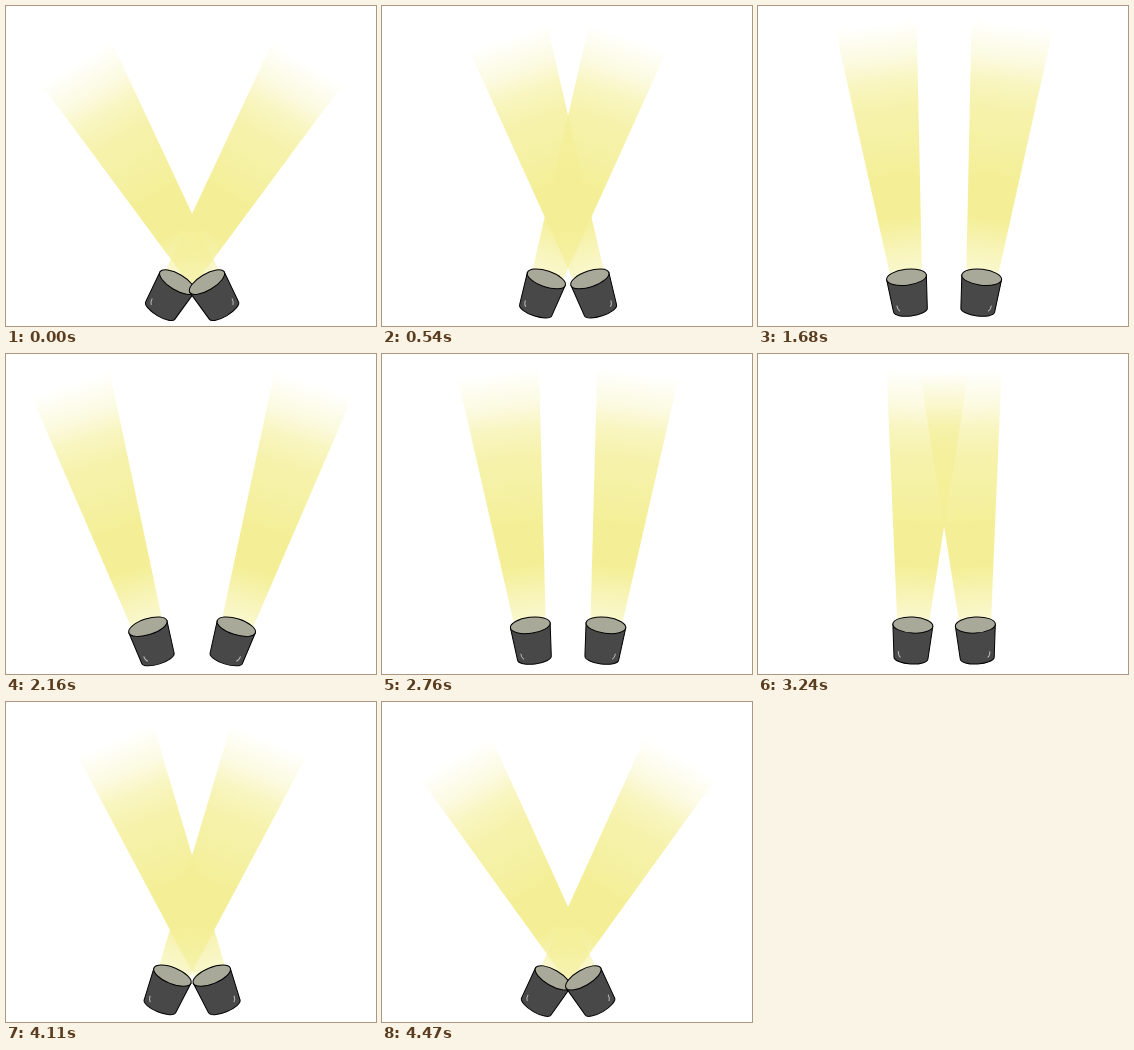
An HTML page for the animation above (4.5 s loop, 370 by 320 pixels).

```html
<!DOCTYPE html>
<html lang="en">
<head>
<meta charset="utf-8">
<title>Spotlights</title>
<style>
  html, body { margin: 0; height: 100%; overflow: hidden; background: #fff; }
  svg { display: block; }
  stop { stop-color: #f4ef97; }
</style>
</head>
<body>
<svg width="370" height="320" viewBox="0 0 370 320">
  <defs>
    <linearGradient id="glow" gradientUnits="userSpaceOnUse" x1="0" y1="-33" x2="0" y2="-288">
      <stop offset="0" stop-opacity=".42"/>
      <stop offset=".12" stop-opacity=".7"/>
      <stop offset=".23"/>
      <stop offset=".4"/>
      <stop offset=".5" stop-opacity=".9"/>
      <stop offset=".66" stop-opacity=".8"/>
      <stop offset=".77" stop-opacity=".6"/>
      <stop offset=".86" stop-opacity=".3"/>
      <stop offset="1" stop-opacity="0"/>
    </linearGradient>
    <path id="beam" fill="url(#glow)" d="M-15.6-33L-41-288H41L15.6-33Z"/>
    <g id="lamp" stroke="#000">
      <path fill="#484848" d="M-20-33L-17 0A17 6 0 0 0 17 0L20-33Z"/>
      <ellipse cy="-33" rx="20" ry="8" fill="#a9a999"/>
      <path fill="none" stroke="#bbb" d="M-13-6Q-13-2-10.5 0"/>
    </g>
  </defs>
  <!-- Both lamps turn about a point below their base; the right one mirrors the left. -->
  <use href="#beam" class="left"/>
  <use href="#beam" class="right"/>
  <use href="#lamp" class="left"/>
  <use href="#lamp" class="right"/>
</svg>
<script>
  const LOOP = 4500, TURN = 2220, STEP = 30;
  const INWARD = 30.8, OUTWARD = -19;

  function place(selector, transform) {
    for (const el of document.querySelectorAll(selector)) el.setAttribute('transform', transform);
  }

  function draw(now) {
    const t = Math.floor((now % LOOP) / STEP) * STEP;
    const swing = t < TURN ? t / TURN : (LOOP - t) / (LOOP - TURN);
    const angle = INWARD + (OUTWARD - INWARD) * swing;
    const pose = `translate(152.8 307) rotate(${angle}) translate(0 -3)`;
    place('.left', pose);
    place('.right', `translate(372.2 0) scale(-1 1) ${pose}`);
  }

  const start = performance.now();
  function tick() {
    draw(performance.now() - start);
    requestAnimationFrame(tick);
  }
  tick();
</script>
</body>
</html>
```
